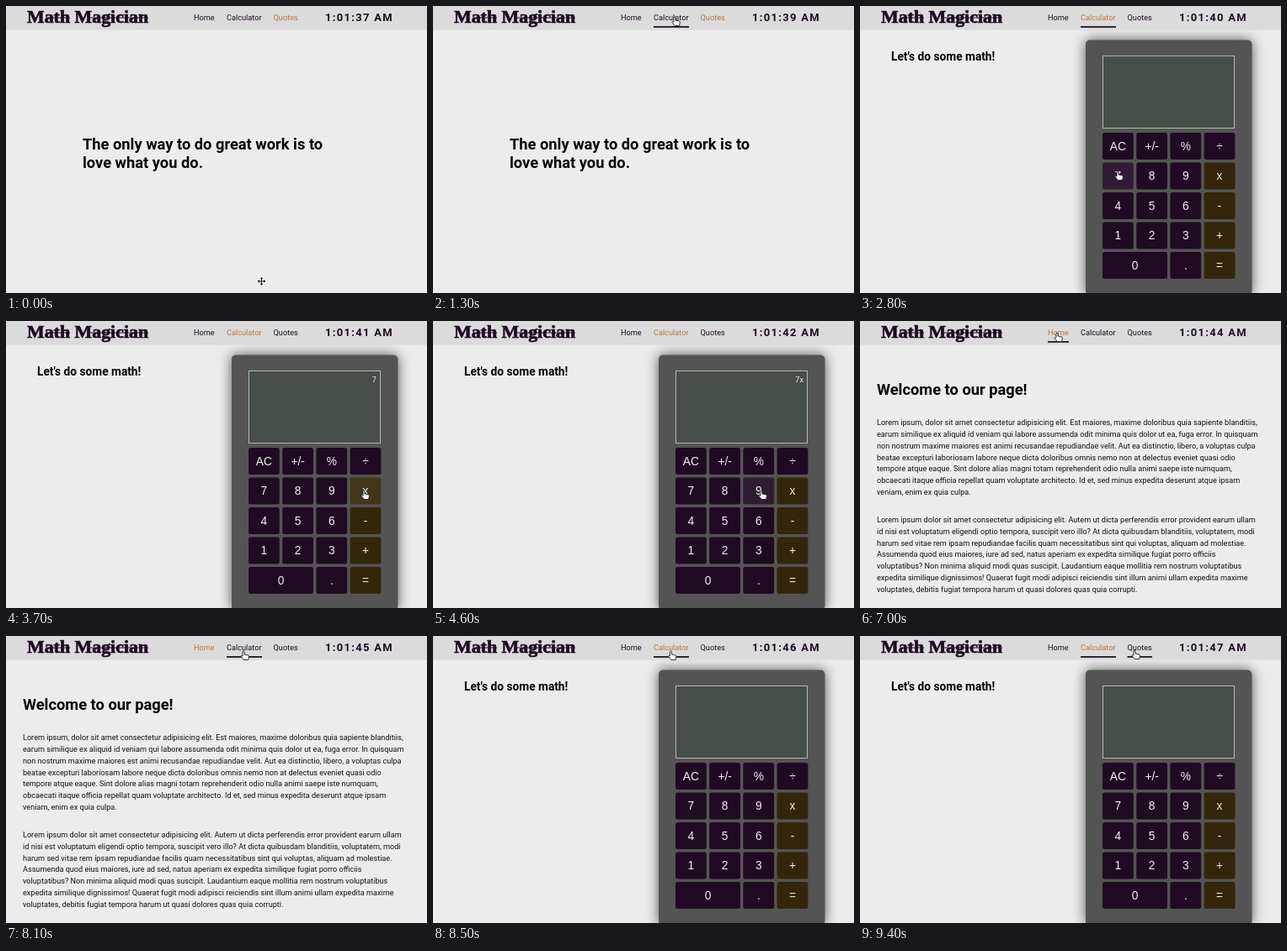
Animation of 500 by 342 pixels, one loop 9700 ms. Source, as an HTML page with a canvas:

```html
<!DOCTYPE html>
<html lang="en">
<head>
<meta charset="utf-8">
<title>Math Magician</title>
<style>
  html, body { margin: 0; width: 100%; height: 100%; overflow: hidden; background: #ececec; }
  canvas { display: block; width: 500px; height: 342px; }
</style>
</head>
<body>
<canvas id="stage"></canvas>
<script>
const LOOP = 9700;
const canvas = document.getElementById('stage');
const ctx = canvas.getContext('2d');
const ratio = window.devicePixelRatio || 1;
canvas.width = 500 * ratio;
canvas.height = 342 * ratio;

const SANS = 'Roboto, sans-serif';
const INK = '#1f0b23', ACTIVE = '#b87442';

// Each list holds [start time, value]; the last entry already started applies.
const PAGES = [[0, 'Quotes'], [2000, 'Calculator'], [7000, 'Home'], [8300, 'Calculator']];
const SMALL = [[0, ''], [3100, '7'], [3900, '7x'], [4700, '7x9'], [5300, '63'], [6100, '']];
const LARGE = [[0, ''], [5300, '63'], [6100, '']];
// Moments after which the picture rests, [from, until].
const HOLDS = [[0, 200], [1300, 2000], [2000, 2400], [5300, 5500], [5900, 6100],
  [6700, 7000], [7000, 7200], [8100, 8300], [9100, 9400], [9400, LOOP]];

// Pointer path: [time, x, y]
const PATH = [
  [200, 303.5, 328], [1150, 287, 13], [2400, 287, 14], [2700, 306, 197],
  [3300, 306, 198], [3700, 425, 202], [4000, 425, 202], [4400, 390, 202],
  [4700, 390, 202], [5100, 426, 306], [5400, 426, 306], [5800, 293, 164],
  [6150, 293, 164], [6700, 234, 14], [7200, 234, 14], [7900, 282, 18],
  [9000, 283, 18], [9300, 326, 17]
];

const LINKS = [
  { name: 'Home', x: 223, w: 25 },
  { name: 'Calculator', x: 262, w: 42 },
  { name: 'Quotes', x: 317.5, w: 29.5 }
];

const KEYS = ['AC +/- % ÷', '7 8 9 x', '4 5 6 -', '1 2 3 +', '0 . ='].flatMap((line, row) => {
  let col = 0;
  return line.split(' ').map(label => {
    const span = label === '0' ? 2 : 1;
    const key = { label, x: 288 + col * 40.2, y: 151 + row * 35.5, w: span * 40.2 - 3.4, h: 32,
      color: row && col === 3 ? '#34260a' : '#200a23' };
    col += span;
    return key;
  });
});

const PARAGRAPHS = [[124.3, [
  'Lorem ipsum, dolor sit amet consectetur adipisicing elit. Est maiores, maxime doloribus quia sapiente blanditiis,',
  'earum similique ex aliquid id veniam qui labore assumenda odit minima quis dolor ut ea, fuga error. In quisquam',
  'non nostrum maxime maiores est animi recusandae repudiandae velit. Aut ea distinctio, libero, a voluptas culpa',
  'beatae excepturi laboriosam labore neque dicta doloribus omnis nemo non at delectus eveniet quasi odio',
  'tempore atque eaque. Sint dolore alias magni totam reprehenderit odio nulla animi saepe iste numquam,',
  'obcaecati itaque officia repellat quam voluptate architecto. Id et, sed minus expedita deserunt atque ipsam',
  'veniam, enim ex quia culpa.'
]], [240, [
  'Lorem ipsum dolor sit amet consectetur adipisicing elit. Autem ut dicta perferendis error provident earum ullam',
  'id nisi est voluptatum eligendi optio tempora, suscipit vero illo? At dicta quibusdam blanditiis, voluptatem, modi',
  'harum sed vitae rem ipsam repudiandae facilis quam necessitatibus sint qui voluptas, aliquam ad molestiae.',
  'Assumenda quod eius maiores, iure ad sed, natus aperiam ex expedita similique fugiat porro officiis',
  'voluptatibus? Non minima aliquid modi quas suscipit. Laudantium eaque mollitia rem nostrum voluptatibus',
  'expedita similique dignissimos! Quaerat fugit modi adipisci reiciendis sint illum animi ullam expedita maxime',
  'voluptates, debitis fugiat tempora harum ut quasi dolores quas quia corrupti.'
]]];

const current = (list, t) => list.filter(([start]) => start <= t).pop()[1];

function snapTime(t) {
  const hold = HOLDS.find(([from, until]) => t >= from && t < until);
  return hold ? hold[0] : Math.floor(t / 100) * 100;
}

function pointerAt(t) {
  const i = PATH.findIndex(p => p[0] > t);
  if (i === 0) return { x: PATH[0][1], y: PATH[0][2] };
  if (i < 0) return { x: PATH.at(-1)[1], y: PATH.at(-1)[2] };
  const [t0, x0, y0] = PATH[i - 1], [t1, x1, y1] = PATH[i];
  const u = (t - t0) / (t1 - t0), e = u * u * (3 - 2 * u);
  return { x: x0 + (x1 - x0) * e, y: y0 + (y1 - y0) * e };
}

const inside = (p, r) => p.x >= r.x && p.x <= r.x + r.w && p.y >= r.y && p.y <= r.y + r.h;
const linkAt = p => LINKS.find(link => inside(p, { ...link, y: 5, h: 21 }));

function text(str, x, y, font, color = '#08040a', align = 'left', spacing = 0) {
  ctx.font = font;
  ctx.fillStyle = color;
  ctx.textAlign = align;
  ctx.letterSpacing = spacing + 'px';
  ctx.fillText(str, x, y);
}

function box(x, y, w, h, r, color) {
  ctx.fillStyle = color;
  ctx.beginPath();
  ctx.roundRect(x, y, w, h, r);
  ctx.fill();
}

function drawHeader(t, page) {
  box(0, 0, 500, 28.5, 0, '#dbdbdb');
  text('Math Magician', 25, 20, 'bold 21.9px "Liberation Serif", serif', INK);
  ctx.strokeStyle = INK;
  ctx.lineWidth = 0.7;
  ctx.strokeText('Math Magician', 25, 20);
  box(47, 13.5, 29, 1, 0, INK);
  box(100, 13.5, 69, 1, 0, INK);

  // Underlines linger briefly after the pointer leaves a link.
  const lit = [linkAt(pointerAt(t)), linkAt(pointerAt(t - 400))];
  for (const link of LINKS) {
    text(link.name, link.x, 17, `9.2px ${SANS}`, link.name === page ? ACTIVE : INK);
    if (lit.includes(link)) box(link.x, 24, link.w, 1.7, 0, INK);
  }
  const seconds = 37 + Math.floor((t + 800) / 1000);
  text(`1:01:${seconds} AM`, 379, 18, `bold 13px ${SANS}`, INK, 'left', 1.3);
}

function drawCalculator(t, pointer) {
  text("Let's do some math!", 37, 65, `bold 13.72px ${SANS}`);
  ctx.save();
  ctx.shadowColor = 'rgba(0,0,0,.65)';
  ctx.shadowBlur = 15 * ratio;
  box(268, 40.5, 197.5, 304, 5, '#545454');
  ctx.restore();

  box(288, 59, 157, 87, 0, '#474d48');
  ctx.strokeStyle = '#b3b7b2';
  ctx.lineWidth = 1;
  ctx.strokeRect(288.5, 59.5, 156, 86);
  text(current(SMALL, t), 440, 73.3, `9.15px ${SANS}`, '#f0f0f0', 'right');
  text(current(LARGE, t), 440, 111.5, `22.86px ${SANS}`, '#f0f0f0', 'right');

  for (const key of KEYS) {
    const color = inside(pointer, key) ? (key.color === '#34260a' ? '#43351a' : '#301b34') : key.color;
    box(key.x, key.y, key.w, key.h, 2.5, color);
    text(key.label, key.x + key.w / 2, key.y + 20.5,
      '13.72px "Liberation Sans", sans-serif', '#f2f0f2', 'center');
  }
}

function drawHome() {
  text('Welcome to our page!', 20, 88, `bold 18.29px ${SANS}`);
  for (const [top, lines] of PARAGRAPHS)
    lines.forEach((line, i) => text(line, 20, top + i * 13.78, `9.145px ${SANS}`, '#141016'));
}

function drawQuote() {
  text('The only way to do great work is to', 91, 171, `bold 18.29px ${SANS}`);
  text('love what you do.', 91, 193, `bold 18.29px ${SANS}`);
}

const HAND = new Path2D('M-1 .5Q0-.6 1 .5V4L5 4.8Q6.5 5 6.4 6.5L5.6 10.5H.3L-3 6.5Q-3.4 5-1 6Z');
const CROSS = new Path2D('M0-3.5V3.5M-3.5 0H3.5');
const HEADS = new Path2D('M0-5L2-2.7H-2ZM0 5L2 2.7H-2ZM-5 0L-2.7-2V2ZM5 0L2.7-2V2Z');

function drawPointer(p, isHand) {
  ctx.save();
  ctx.translate(p.x, p.y);
  ctx.lineJoin = 'round';
  if (isHand) {
    ctx.fillStyle = '#fff';
    ctx.strokeStyle = '#222';
    ctx.lineWidth = 0.9;
    ctx.fill(HAND);
    ctx.stroke(HAND);
  } else {
    for (const [color, width] of [['#fff', 2.4], ['#111', 1]]) {
      ctx.strokeStyle = ctx.fillStyle = color;
      ctx.lineWidth = width;
      ctx.stroke(CROSS);
      if (color === '#fff') ctx.stroke(HEADS);
      ctx.fill(HEADS);
    }
  }
  ctx.restore();
}

function draw(now) {
  const t = snapTime(now % LOOP);
  const page = current(PAGES, t), pointer = pointerAt(t);
  ctx.setTransform(ratio, 0, 0, ratio, 0, 0);
  box(0, 0, 500, 342, 0, '#ececec');
  if (page === 'Calculator') drawCalculator(t, pointer);
  else if (page === 'Home') drawHome();
  else drawQuote();
  drawHeader(t, page);
  const overKey = page === 'Calculator' && KEYS.some(key => inside(pointer, key));
  drawPointer(pointer, overKey || linkAt(pointer));
}

const start = performance.now();
function tick() {
  draw(performance.now() - start);
  requestAnimationFrame(tick);
}
tick();
</script>
</body>
</html>
```
